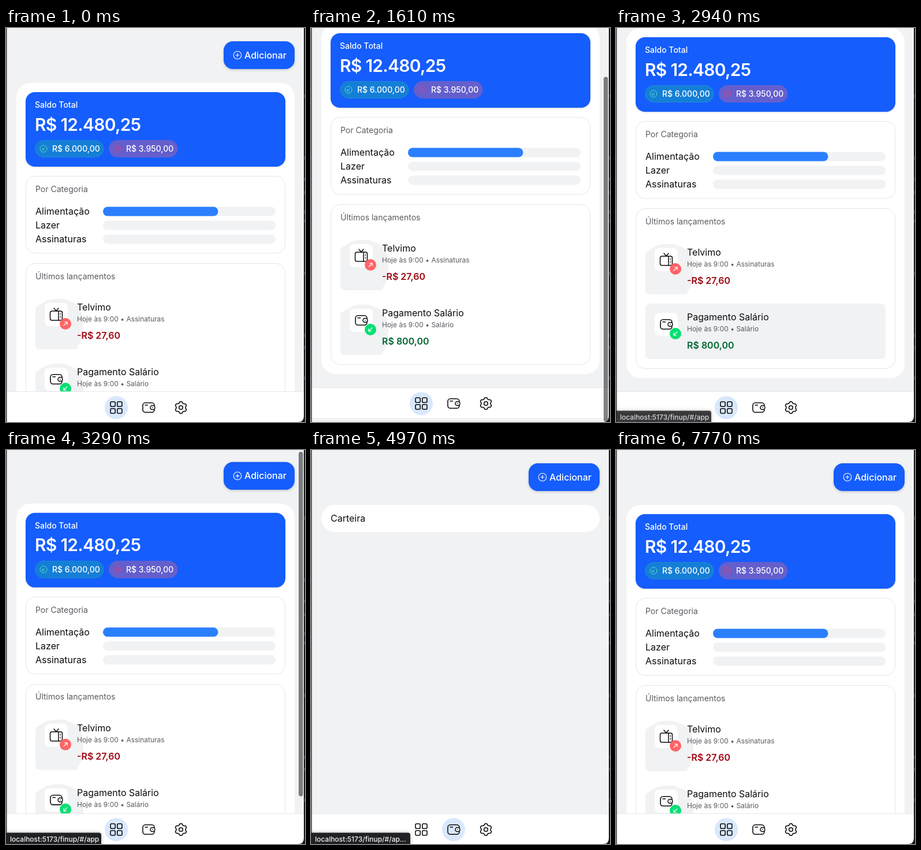
Recreate the animation shown at these times as an HTML page with a canvas. Size 518 by 682 pixels, loop 7840 ms.

```html
<!DOCTYPE html>
<html lang="pt-BR">
<head>
<meta charset="utf-8">
<title>Painel financeiro</title>
<style>
  html, body { margin: 0; width: 100%; height: 100%; overflow: hidden; background: #111; }
  canvas { display: block; width: 518px; height: 682px; }
</style>
</head>
<body>
<canvas id="stage"></canvas>
<script>
const W = 518, H = 682, LOOP = 7840, TICK = 70;
const MAX_SCROLL = 95, PAGE_H = 777, ROW_GAP = 112;
const GRAY = '#f1f2f4', BLUE = '#155dfc', SKY = '#d9e8fc', INK = '#0b0b0c', MUTED = '#595b60';

const canvas = document.getElementById('stage');
const dpr = window.devicePixelRatio || 1;
canvas.width = W * dpr;
canvas.height = H * dpr;
const c = canvas.getContext('2d');

const clamp = v => Math.max(0, Math.min(1, v));
const ramp = (t, a, b) => clamp((t - a) / (b - a));
const ease = p => p * p * (3 - 2 * p);
const between = (t, a, b) => t >= a && t < b;

// ---------- drawing helpers ----------
function box(x, y, w, h, r, fill, stroke, line = 1) {
  c.beginPath();
  c.roundRect(x, y, w, h, r);
  if (fill) { c.fillStyle = fill; c.fill(); }
  if (stroke) { c.strokeStyle = stroke; c.lineWidth = line; c.stroke(); }
}

function disc(x, y, r, fill, stroke, line = 1) {
  c.beginPath();
  c.arc(x, y, r, 0, Math.PI * 2);
  if (fill) { c.fillStyle = fill; c.fill(); }
  if (stroke) { c.strokeStyle = stroke; c.lineWidth = line; c.stroke(); }
}

function text(str, x, y, size, color, weight = 400, spacing = 0) {
  c.font = `${weight} ${size}px Inter, "Liberation Sans", sans-serif`;
  c.letterSpacing = spacing + 'px';
  c.fillStyle = color;
  c.fillText(str, x, y);
}

function lines(d, color, width) {
  c.strokeStyle = color;
  c.lineWidth = width;
  c.stroke(new Path2D(d));
}

function at(x, y, draw) {
  c.save();
  c.translate(x, y);
  draw();
  c.restore();
}

function shadow(color, blur, dy) {
  c.shadowColor = color;
  c.shadowBlur = blur * dpr;
  c.shadowOffsetY = dy * dpr;
}

function faded(alpha, draw) {
  if (alpha <= 0) return;
  c.save();
  c.globalAlpha = alpha;
  draw();
  c.restore();
}

// ---------- icons, centred on 0,0 ----------
const arrow = (dir, s, color, width) =>
  lines(`M${-dir * s} ${dir * s}L${dir * s} ${-dir * s}M${-dir * s * .5} ${-dir * s}H${dir * s}V${dir * s * .5}`, color, width);

function tvIcon() {
  box(-10.5, -6, 21, 16, 3, null, INK, 1.5);
  lines('M4 -6V10M-4 -11L0 -6.3L4 -11M7 -1H7.6M7 4H7.6', INK, 1.5);
}

function walletIcon() {
  box(-10, -8.3, 20, 16.6, 4.5, null, INK, 1.6);
  box(3, -3.5, 8, 7, 3.5, '#fff', INK, 1.5);
  lines('M-6 -4.3H-1.5M6.8 0H7', INK, 1.6);
}

function gridIcon() {
  for (const x of [-10, 1.8])
    for (const y of [-10, 1.8]) box(x, y, 8.2, 8.2, 2, null, INK, 1.6);
}

function gearIcon() {
  c.beginPath();
  for (let i = 0; i < 120; i++) {
    const a = i * Math.PI / 60;
    const r = 9.2 + 1.1 * Math.tanh(2 * Math.cos(6 * a));
    c.lineTo(r * Math.sin(a), -r * Math.cos(a));
  }
  c.closePath();
  c.strokeStyle = INK;
  c.lineWidth = 1.6;
  c.stroke();
  disc(0, 0, 3.3, null, INK, 1.6);
}

// ---------- page parts ----------
function addButton() {
  c.save();
  shadow('rgba(0,0,0,.2)', 4, 1.5);
  box(377, 23, 123, 48, 16, BLUE);
  c.restore();
  disc(401, 47, 6.8, null, '#fff', 1.1);
  lines('M398 47H404M401 44V50', '#fff', 1.1);
  text('Adicionar', 413, 52.5, 16, '#fff', 500);
}

function pill(x, fill, edge, iconColor, dir, label) {
  box(x + .5, 194.5, 118.5, 29, 14.5, fill, edge);
  disc(x + 15, 209, 6, null, iconColor);
  at(x + 15, 209, () => arrow(dir, 2, iconColor, 1));
  text(label, x + 30, 214, 14, '#fff', 500);
}

function balance() {
  c.save();
  shadow('rgba(0,0,0,.16)', 3, 1);
  box(34, 111, 450, 129, 16, BLUE);
  c.restore();
  text('Saldo Total', 50, 138, 14, '#fff', 500);
  text('R$ 12.480,25', 50, 177.5, 30, '#fff', 600, -.75);
  pill(50, '#147fd6', '#2489d3', '#5fd6c4', -1, 'R$ 6.000,00');
  pill(178, '#645fcd', '#705fc6', '#d2437f', 1, 'R$ 3.950,00');
}

function categories() {
  box(34.5, 256.5, 449, 133.5, 16, '#fff', '#e3e5e8');
  text('Por Categoria', 51, 284, 14, MUTED);
  ['Alimentação', 'Lazer', 'Assinaturas'].forEach((name, i) => {
    const y = 323 + i * 24;
    text(name, 51, y, 16, INK);
    box(168, y - 13.5, 299, 16, 8, GRAY);
  });
  box(168, 309.5, 199.5, 16, 8, '#2b7fff');
}

function entry(i, hover, e) {
  at(0, i * ROW_GAP, () => {
    c.fillStyle = GRAY;
    c.fill(new Path2D('M51 484Q60 477 72 471Q84 468 100 469Q113 473 123 479Q133 490 134 508Q134 530 131 540L122 556H59Q51 556 51 548Z'));
    faded(hover, () => box(51, 460, 416, 96, 8, GRAY));
    box(67, 476, 40, 40, 8, '#fff');
    at(87, 496, e.icon);
    disc(103, 512, 10, e.badge);
    at(103, 512, () => arrow(e.dir, 3, '#fff', 1.2));
    text(e.name, 123, 489, 16, INK);
    text(e.note, 123, 508, 12, MUTED);
    text(e.amount, 123, 538, 16, e.color, 600);
  });
}

const entries = [
  { name: 'Telvimo', note: 'Hoje às 9:00 • Assinaturas', amount: '-R$ 27,60', color: '#9f0712', badge: '#ff6467', dir: 1, icon: tvIcon },
  { name: 'Pagamento Salário', note: 'Hoje às 9:00 • Salário', amount: 'R$ 800,00', color: '#016630', badge: '#05df72', dir: -1, icon: walletIcon }
];

function dashboard(hover) {
  box(18, 95, 482, 606, 24, '#fff');
  balance();
  categories();
  box(34.5, 407.5, 449, 277, 16, '#fff', '#e3e5e8');
  text('Últimos lançamentos', 51, 434.5, 14, MUTED);
  entries.forEach((e, i) => entry(i, i ? hover : 0, e));
}

function walletPage() {
  box(18, 95, 482, 47, 23.5, '#fff');
  text('Carteira', 34, 124, 16, INK);
}

function nav(dy, gridOn, walletOn) {
  at(0, dy, () => {
    c.fillStyle = '#fff';
    c.fillRect(0, 629.5, W, 52.5);
    c.fillStyle = '#e5e7ea';
    c.fillRect(0, 629, W, 1);
    faded(gridOn, () => disc(191, 657, 20, SKY));
    faded(walletOn, () => disc(247, 657, 20, SKY));
    at(191, 657, gridIcon);
    at(247, 657, walletIcon);
    at(303, 657, gearIcon);
  });
}

function statusBar(alpha, short) {
  faded(alpha, () => {
    c.save();
    shadow('rgba(0,0,0,.3)', 6, 0);
    box(-4, 662.5, short ? 176 : 169, 24, 4, '#202124');
    c.restore();
    text('localhost:5173/finup/#/' + (short ? 'ap…' : 'app'), 7, 678, 12, '#f4f5f6', 500);
  });
}

function windowEdges() {
  c.fillStyle = '#454649';
  c.fillRect(0, 0, 1.5, H);
  c.fillStyle = '#17181a';
  c.fillRect(516, 0, 2, H);
  c.beginPath();
  c.moveTo(516, 672);
  c.quadraticCurveTo(516, 682, 506, 682);
  c.lineTo(518, 682);
  c.lineTo(518, 672);
  c.fill();
  c.fillStyle = '#55575b';
  for (const y of [118, 225, 262, 285, 318, 334, 425, 532, 553, 606]) c.fillRect(517, y - 3, 1, 6);
}

// ---------- motion ----------
function scrollAt(t) {
  if (t < 1610) return 102 * ease(ramp(t, 1330, 1610));
  if (t < 2450) return MAX_SCROLL + 7 * Math.exp(-(t - 1610) / 130);
  if (t < 3360) return MAX_SCROLL - 103 * ease(ramp(t, 3000, 3360));
  return t < 4340 ? -8 * Math.exp(-(t - 3360) / 135) : 0;
}

function scrollbarAt(t) {
  if (t < 2800) return ramp(t, 1330, 1470) * (1 - ramp(t, 2100, 2450));
  return ramp(t, 2940, 3080) * (1 - ramp(t, 4060, 4340));
}

function render(t) {
  const onWallet = between(t, 4970, 6440);
  const s = scrollAt(t);
  const inside = Math.max(0, Math.min(MAX_SCROLL, s));

  c.setTransform(dpr, 0, 0, dpr, 0, 0);
  c.lineCap = c.lineJoin = 'round';
  c.fillStyle = GRAY;
  c.fillRect(0, 0, W, H);

  at(0, -s, () => {
    addButton();
    if (onWallet) walletPage();
    else dashboard(ramp(t, 2520, 2730) * (1 - ramp(t, 3080, 3220)));
  });

  nav(inside - s,
    onWallet ? ramp(t, 5600, 5810) : 1,
    t < 6440 ? ramp(t, 4480, 4620) : 0);

  faded(scrollbarAt(t), () => {
    const len = H * H / PAGE_H;
    box(507, 1 + inside * H / PAGE_H, 7.5, len - 2, 3.75, 'rgba(0,0,0,.49)');
  });

  windowEdges();
  statusBar(ramp(t, 2800, 2965) * (1 - ramp(t, 7560, 7770)), between(t, 4550, 5740));
}

function loop() {
  const t = performance.now() % LOOP;
  render(Math.floor(t / TICK) * TICK);
  requestAnimationFrame(loop);
}
loop();
</script>
</body>
</html>
```
